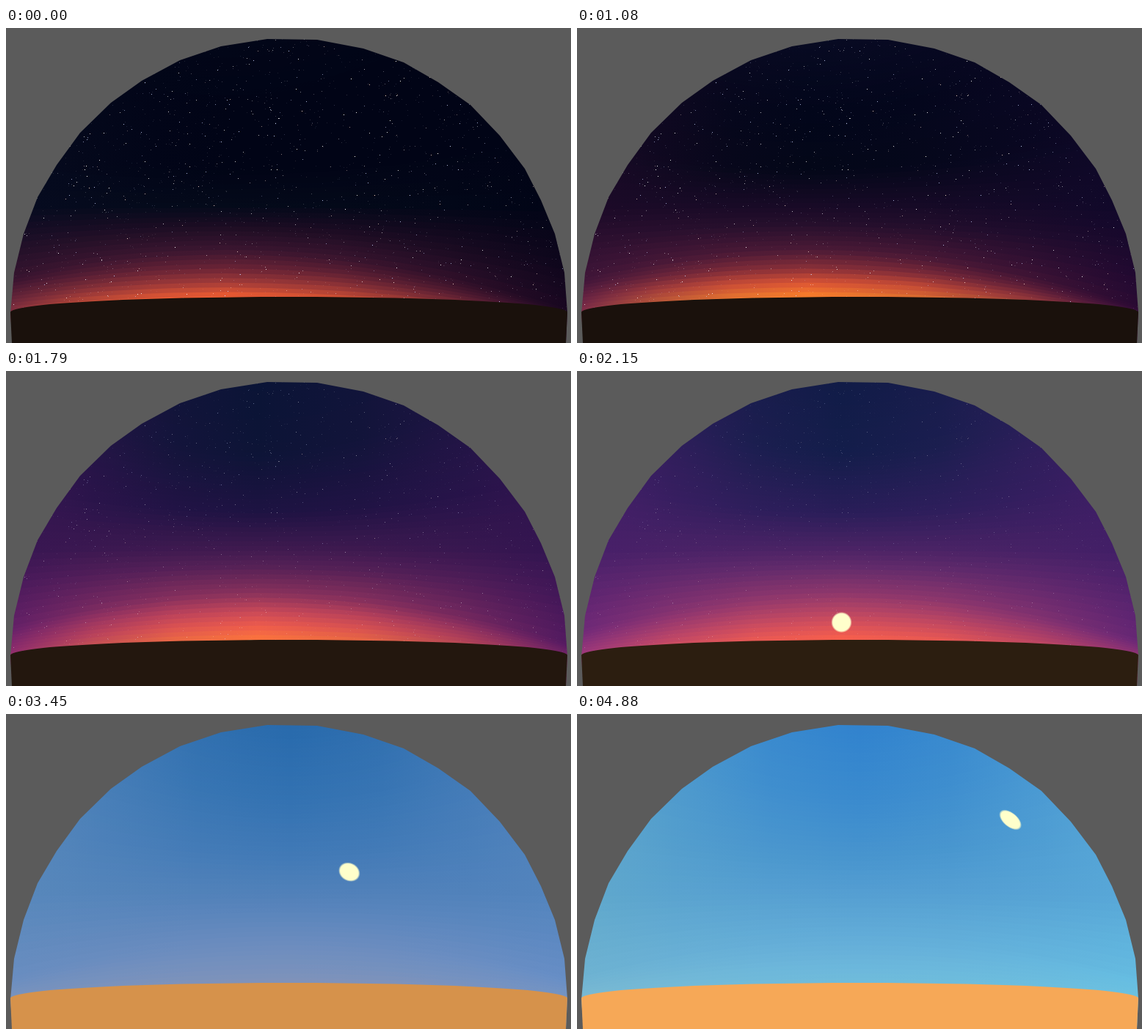
An HTML page with a canvas that plays this animation: 770 by 430 pixels, repeating every 4.91 s.

```html
<!DOCTYPE html>
<html lang="en">
<head>
<meta charset="utf-8">
<title>Sunrise dome</title>
<style>
html, body { margin: 0; width: 100%; height: 100%; overflow: hidden; background: #5b5b5b; }
canvas { display: block; width: 770px; height: 430px; }
</style>
</head>
<body>
<canvas id="stage" width="770" height="430"></canvas>
<script>
const ctx = document.getElementById('stage').getContext('2d', { alpha: false });
const LOOP = 4910, STEP = 30, W = 770, H = 430, BAND = 6.4;

const domeLine = 'M9 430 6 390 11 334 24 281 43 231 69 187 101 143 143 102 185 72 237 44 293 25 356 15 424 16 487 28 542 47 589 74 633 105 673 147 707 192 729 235 748 281 761 334 765 388 763 430Z';
const outside = new Path2D('M0 0H770V430H0Z' + domeLine);
const land = new Path2D('M6 388A379.5 21 0 0 1 765 388L763 430H8Z');

// Heights of the colour rows on the middle axis and at the rims.
const ROWS = [15, 110, 190, 240, 265, 300, 325, 345, 367];
const RIM = [240, 315, 367];

const rgb = s => s.split(' ').map(h => [0, 2, 4].map(i => parseInt(h.slice(i, i + 2), 16)));
const sky = (t, cx, stars, ground, mid, left, right) =>
  ({ t, cx, stars, ground: rgb(ground)[0], mid: rgb(mid), left: rgb(left), right: rgb(right) });

const skies = [
  sky(0, 300, 1, '1a110c',
    '020618 010416 010416 040a1a 1a0c22 3c1630 6b2436 a63c38 ff6430',
    '060b20 3a1430 7a2c3e', '010416 1c0822 38103a'),
  sky(1080, 315, .95, '1a110c',
    '070a22 02061a 030718 180a26 260f2c 4c1a36 8a3038 dc5434 ff8a28',
    '1c0a28 43163a 7c2a48', '10082a 2c0a34 4c1648'),
  sky(1410, 325, .65, '1a110c',
    '040c24 060a22 12082c 34113a 4c1842 842c4c d84a4c ff6440 ff9028',
    '280c3c 5c185a 841f60', '220a3a 440e4e 641a60'),
  sky(2150, 362, .3, '2c1e10',
    '111c48 141e4c 2a1e5a 4c2466 642c6c 8f386c b84664 dc5258 ff624a',
    '48206a 742a7a a03a7c', '421f68 6c2878 9a3674'),
  sky(2940, 390, .03, 'b47c3e',
    '21558e 2a5a96 3d60a0 4f64a2 5a68a4 6e6ca4 7a6ea2 846e9e 946e98',
    '5168a8 6a6ab0 7e70aa', '5168a8 6a6ab0 7e70aa'),
  sky(3940, 385, 0, 'f6a857',
    '2f7fca 3a88cc 4592cc 529ccf 58a0d2 62a8d6 68aed8 6cb2da 72b6d8',
    '5ea6ce 6cb0d0 78b6ce', '549fd2 66b2dc 70b8da'),
  sky(4880, 385, 0, 'f6a857',
    '3183ce 3a8ace 4794ce 549ed2 5aa4d4 62acd8 68b2da 6cb8dc 70bcda',
    '60a8cc 70b4d2 7cbad2', '58a8d8 66bee2 6cc2e0')
];
const skyTimes = skies.map(s => s.t);

// time, x, y, long radius, short radius, tilt in degrees
const sunPath = [
  [1700, 328, 388, 14, 14, 0],
  [2150, 362, 341, 14, 14, 0],
  [2940, 423, 259, 14.2, 13.2, 20],
  [3250, 449, 231, 14.7, 12.8, 26],
  [3940, 514, 178, 16, 11.8, 33],
  [4370, 557, 156, 17, 10.8, 37],
  [4880, 592, 144, 18, 9.8, 40]
];
const sunTimes = sunPath.map(p => p[0]);

const mix = (a, b, u) => Array.isArray(a) ? a.map((v, i) => mix(v, b[i], u)) : a + (b - a) * u;
const css = c => `rgb(${c.map(Math.round).join()})`;

// Finds the segment around v and the share within it.
function locate(stops, v) {
  let i = 0;
  while (i < stops.length - 2 && v > stops[i + 1]) i++;
  const u = (v - stops[i]) / (stops[i + 1] - stops[i]);
  return [i, Math.min(1, Math.max(0, u))];
}
function sample(stops, values, v) {
  const [i, u] = locate(stops, v);
  return mix(values[i], values[i + 1], u);
}

let seed = 7431;
function rand() {
  seed = seed + 0x6d2b79f5 | 0;
  let k = Math.imul(seed ^ seed >>> 15, seed | 1);
  k ^= k + Math.imul(k ^ k >>> 7, k | 61);
  return ((k ^ k >>> 14) >>> 0) / 4294967296;
}

// The star field never moves, so it is painted once and only faded.
const starField = document.createElement('canvas');
starField.width = W;
starField.height = H;
const pen = starField.getContext('2d');
for (let i = 0; i < 2300; i++) {
  const tint = rand();
  pen.globalAlpha = .1 + .9 * rand() ** 4.2;
  pen.fillStyle = tint < .3 ? '#c8d4ff' : tint > .85 ? '#ffe0d0' : '#fff';
  pen.fillRect(6 + Math.floor(rand() * 759), 15 + Math.floor(rand() * 372), 1, 1);
}

const bend = y => y < 240 ? (y - 240) * .9 : sample([240, 310, 367], [0, 50, 21], y);

// Left end, control and right end heights of the curve through y.
function curve(cx, y) {
  const a = -cx / 380, b = (W - cx) / 380, k = bend(y);
  return [a * a, a * b, b * b].map(v => y + k * v);
}

function drawBand(s, y) {
  const { cx } = s;
  const mid = sample(ROWS, s.mid, y);
  const left = sample(RIM, s.left, y), right = sample(RIM, s.right, y);
  const fill = ctx.createLinearGradient(5, 0, 765, 0);
  for (let i = -3; i <= 3; i++) {
    const n = Math.abs(i) / 3;
    const x = mix(cx, i < 0 ? 5 : 765, n);
    fill.addColorStop((x - 5) / 760, css(mix(mid, i < 0 ? left : right, n ** 1.7)));
  }
  const top = curve(cx, y);
  const low = y + BAND > 367 ? [H, H, H] : curve(cx, y + BAND).map(v => v + 1.5);
  ctx.fillStyle = fill;
  ctx.beginPath();
  ctx.moveTo(0, top[0]);
  ctx.quadraticCurveTo(W / 2, top[1], W, top[2]);
  ctx.lineTo(W, low[2]);
  ctx.quadraticCurveTo(W / 2, low[1], 0, low[0]);
  ctx.fill();
}

function drawSun(t) {
  if (t < 1700) return;
  const [, x, y, rx, ry, tilt] = sample(sunTimes, sunPath, t);
  ctx.save();
  ctx.translate(x, y);
  ctx.rotate(tilt * Math.PI / 180);
  ctx.scale(rx, ry);
  const glow = ctx.createRadialGradient(0, 0, 0, 0, 0, 1);
  glow.addColorStop(0, '#ffffcb');
  glow.addColorStop(.84, '#ffffcb');
  glow.addColorStop(1, 'rgba(255,255,203,.15)');
  ctx.fillStyle = glow;
  ctx.beginPath();
  ctx.arc(0, 0, 1, 0, 7);
  ctx.fill();
  ctx.restore();
}

function draw(t) {
  const [i, u] = locate(skyTimes, t);
  const a = skies[i], b = skies[i + 1], s = {};
  for (const key in a) s[key] = mix(a[key], b[key], u);

  ctx.fillStyle = css(s.mid[0]);
  ctx.fillRect(0, 0, W, 120);
  for (let y = 15; y <= 367; y += BAND) drawBand(s, y);
  if (s.stars > 0) {
    ctx.globalAlpha = s.stars;
    ctx.drawImage(starField, 0, 0);
    ctx.globalAlpha = 1;
  }
  drawSun(t);
  ctx.fillStyle = '#5b5b5b';
  ctx.fill(outside, 'evenodd');
  ctx.fillStyle = css(s.ground);
  ctx.fill(land);
}

const start = performance.now();
let shown = -1;
function tick() {
  let t = (performance.now() - start) % LOOP;
  t -= t % STEP;
  if (t > 340 && t < 540) t = 330;
  if (t !== shown) draw(shown = t);
  requestAnimationFrame(tick);
}
tick();
</script>
</body>
</html>
```
